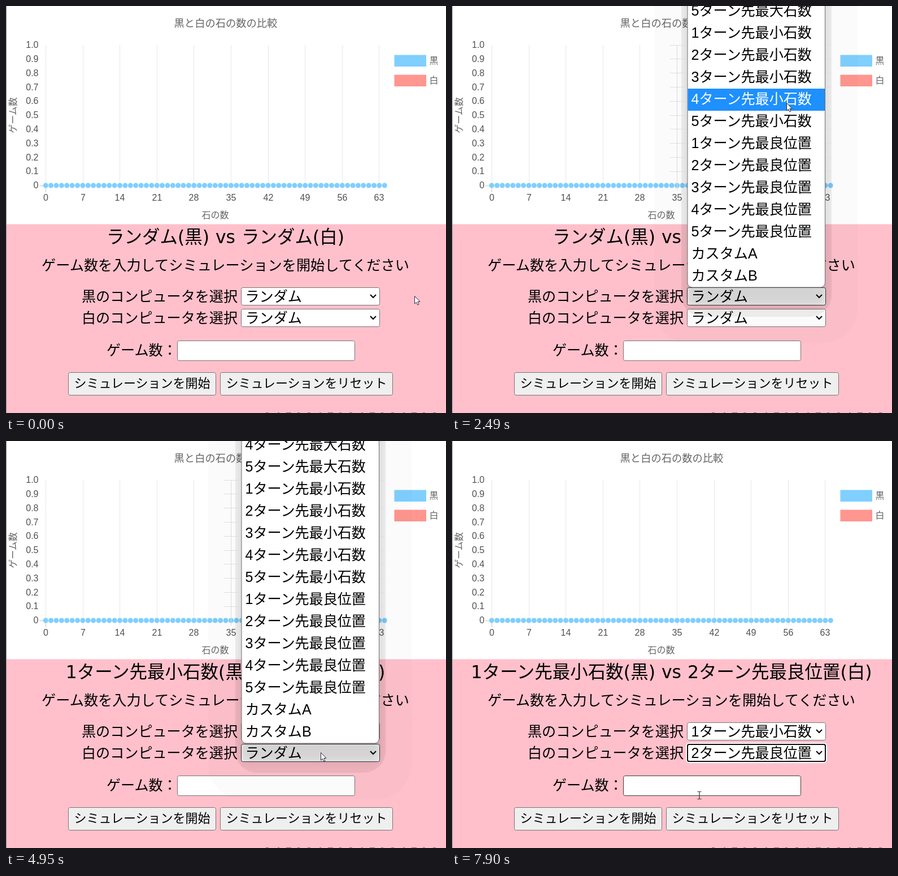
An HTML page for the animation above (8000 ms loop, 779 by 719 pixels).

```html
<!DOCTYPE html>
<html lang="ja">
<head>
<meta charset="utf-8">
<title>シミュレーション</title>
<style>
  html, body { margin: 0; width: 100%; height: 100%; overflow: hidden; background: #fff; }
  svg { display: block; width: 779px; height: 719px; }
  text { font-family: "Noto Sans CJK JP", "Noto Sans CJK", sans-serif; font-weight: 350; fill: #000; }
  .title {
    font-family: "DejaVu Sans", "Noto Sans CJK JP DemiLight", "Noto Sans CJK JP", sans-serif;
    font-weight: 400; word-spacing: 1px;
  }
  .arial { font-family: "Liberation Sans", "Noto Sans CJK JP", "Noto Sans CJK", sans-serif; }
  .chart text { fill: #666; }
  .chart .arial { fill: #505050; }
  .box { fill: #fff; stroke: #767676; }
  .button { fill: #efefef; stroke: #767676; }
  .hover { stroke: #3c3c3c; }
  .ring { fill: none; stroke: #fff; stroke-width: 2; }
  .focus { fill: none; stroke: #101010; stroke-width: 2; }
</style>
</head>
<body>
<svg id="stage" viewBox="0 0 779 719" xmlns="http://www.w3.org/2000/svg">
  <defs>
    <filter id="soft" x="-30%" y="-30%" width="160%" height="160%"><feGaussianBlur stdDeviation="8"/></filter>
  </defs>
</svg>
<script>
const LOOP = 8000;
const stage = document.getElementById('stage');

function el(parent, name, attrs = {}, content = '') {
  const node = document.createElementNS(stage.namespaceURI, name);
  for (const key in attrs) node.setAttribute(key, attrs[key]);
  node.textContent = content;
  parent.appendChild(node);
  return node;
}
const group = (parent, attrs) => el(parent, 'g', attrs);
const rect = (parent, x, y, width, height, attrs) => el(parent, 'rect', { x, y, width, height, ...attrs });
const path = (parent, d, attrs) => el(parent, 'path', { d, ...attrs });
// cy is the middle of the glyph body
const text = (parent, str, x, cy, size, attrs) =>
  el(parent, 'text', { x, y: cy + size * 0.36, 'font-size': size, ...attrs }, str);
const show = (node, on) => node.setAttribute('visibility', on ? 'visible' : 'hidden');

const middle = { 'text-anchor': 'middle' };
const tickX = k => 70.5 + k * 65.6;
const tickY = k => 317 - k * 24.8;

function drawChart() {
  const g = group(stage, { class: 'chart' });
  text(g, '黒と白の石の数の比較', 389, 30.5, 18.3, middle);
  for (let k = 0; k < 10; k++) {
    const x = Math.floor(tickX(k)) + 0.5;
    path(g, `M${x} 69V326`, { stroke: '#e8e8e8' });
    text(g, k * 7, x, 338.5, 16, { class: 'arial', ...middle });
  }
  path(g, 'M59 317.5H70M70.5 317V329', { stroke: '#c8c8c8' });
  for (let k = 0; k <= 10; k++) {
    const label = k ? (k / 10).toFixed(1) : '0';
    text(g, label, 57.5, tickY(k) - 0.5, 16, { class: 'arial', 'text-anchor': 'end' });
  }
  for (let n = 0; n <= 64; n++)
    el(g, 'circle', { cx: 70.3 + n * 9.375, cy: 317, r: 4.5, fill: '#7fcfff' });
  text(g, '石の数', 370.5, 369, 16, middle);
  text(g, 'ゲーム数', 0, 0, 16, { transform: 'translate(12.5 193) rotate(-90)', ...middle });
  [['黒', '#7fcfff'], ['白', '#ff968f']].forEach(([name, fill], i) => {
    rect(g, 687.5, 86.5 + i * 35, 56.5, 20.5, { fill });
    text(g, name, 749.5, 96 + i * 35, 16);
  });
}

function drawSelect(y) {
  const g = group(stage);
  const box = rect(g, 416.5, y + 0.5, 245, 31, { rx: 3 });
  const label = text(g, '', 423.5, y + 16, 25.1, { class: 'arial' });
  path(g, `M645 ${y + 13}l5 5 5-5`, { fill: 'none', stroke: '#000', 'stroke-width': 2 });
  const focus = group(g);
  rect(focus, 415, y - 1, 248, 34, { rx: 5, class: 'ring' });
  rect(focus, 417, y + 1, 244, 30, { rx: 3, class: 'focus' });
  return { y, box, label, focus };
}

function drawButton(str, x, width) {
  rect(stage, x + 0.5, 647.5, width - 1, 40, { rx: 3, class: 'button' });
  text(stage, str, x + width / 2, 666.5, 22, middle);
}

const options = [];
for (const kind of ['最大石数', '最小石数', '最良位置'])
  for (let n = 1; n <= 5; n++) options.push(n + 'ターン先' + kind);
options.push('カスタムA', 'カスタムB');
const ROW = 39;

// Option list that opens upwards and ends at the given bottom edge
function drawPopup(bottom) {
  const g = group(stage);
  rect(g, 358, -80, 360, bottom + 178, { rx: 60, fill: '#000', opacity: 0.014 });
  rect(g, 406, -80, 266, bottom + 132, { rx: 38, fill: '#000', opacity: 0.06 });
  rect(g, 416, -60, 246, bottom + 92, { rx: 12, fill: '#000', opacity: 0.1, filter: 'url(#soft)' });
  for (let k = 1; k <= 10; k++) {
    const y = Math.floor(tickY(k)) + 0.5;
    path(g, `M386 ${y}H417M661 ${y}H671`, { stroke: '#dedede' });
  }
  path(g, 'M398.5 69V326', { stroke: '#dcdcdc' });
  rect(g, 417, -60, 243.5, bottom + 60, { rx: 8, fill: '#fff', stroke: '#6e6e6e' });
  const mark = rect(g, 417.5, 0, 242.5, ROW, { fill: '#1e90ff' });
  const rows = [];
  options.forEach((name, i) => {
    const cy = bottom - 21.5 - (options.length - 1 - i) * ROW;
    if (cy > -25) rows.push({ cy, node: text(g, name, 423.5, cy, 25.1, { class: 'arial' }) });
  });
  return { g, mark, rows, bottom };
}

function updatePopup(popup, open, y) {
  show(popup.g, open);
  const hit = open && y < popup.bottom && popup.rows.find(r => Math.abs(y - r.cy) <= ROW / 2);
  popup.mark.setAttribute('visibility', hit ? 'inherit' : 'hidden');
  if (hit) popup.mark.setAttribute('y', Math.round(hit.cy - 17.5));
  for (const row of popup.rows) row.node.style.fill = row === hit ? '#fff' : '#000';
}

drawChart();
rect(stage, 0, 385.5, 779, 334, { fill: '#ffc0cb' });
path(stage, 'M0.5 0V719', { stroke: '#8a8a8a' });
path(stage, 'M460 718.5H764', { stroke: '#8a6a70', 'stroke-dasharray': '5 16 3 12 9 11 4 14' });
const title = text(stage, '', 388.5, 408, 31.5, { class: 'title', ...middle });
text(stage, 'ゲーム数を入力してシミュレーションを開始してください', 388.5, 458, 25.2, middle);
text(stage, '黒のコンピュータを選択', 134, 512.5, 25.1);
text(stage, '白のコンピュータを選択', 134, 551, 25.1);
text(stage, 'ゲーム数：', 178, 608, 25.1);
const black = drawSelect(497);
const white = drawSelect(535);
const input = rect(stage, 303.5, 591.5, 314, 35, { rx: 3 });
drawButton('シミュレーションを開始', 110, 262);
drawButton('シミュレーションをリセット', 379, 306);
const blackPopup = drawPopup(497);
const whitePopup = drawPopup(534);

const arrow = path(stage, 'M.5 .5V14L3.6 11.2 5.7 16 8 15 5.9 10.3H10Z',
  { fill: '#fff', stroke: '#2b2b3a', 'stroke-linejoin': 'round' });
const beam = path(stage, 'M-3.5-6.5H-1L0-6 1-6.5H3.5M0-6V6M-3.5 6.5H-1L0 6 1 6.5H3.5',
  { fill: 'none', stroke: '#333', 'stroke-width': 1.2 });

const linear = p => p;
const easeOut = p => 1 - (1 - p) ** 2;
const smooth = p => p * p * (3 - 2 * p);

// Pointer moves: first step, last step, number of steps, goal, easing
const moves = [
  [250, 800, 5, 602, 502, easeOut],
  [2050, 2479, 4, 592, 171, linear],
  [2621, 3050, 4, 598, 60, easeOut],
  [3600, 3600, 1, 599, 67, linear],
  [3760, 4560, 6, 557, 550, smooth],
  [5610, 6160, 5, 580, 328, easeOut],
  [7470, 7900, 4, 438, 626, easeOut],
];

function pointer(t) {
  let x = 723, y = 512;
  for (const [start, end, steps, toX, toY, ease] of moves) {
    if (t < start) break;
    const gap = (end - start) / Math.max(1, steps - 1);
    const done = gap ? Math.min(steps, 1 + Math.floor((t - start + 0.5) / gap)) : steps;
    const p = ease(done / steps);
    x += (toX - x) * p;
    y += (toY - y) * p;
  }
  return { x, y };
}

const inside = (p, x, y, w, h) => p.x >= x && p.x <= x + w && p.y >= y && p.y <= y + h;

function updateSelect(select, value, focused, hot) {
  select.label.textContent = value;
  select.box.setAttribute('class', hot ? 'box hover' : 'box');
  show(select.focus, focused);
}

function draw(t) {
  const p = pointer(t);
  const blackValue = t < 3600 ? 'ランダム' : '1ターン先最小石数';
  const whiteValue = t < 7200 ? 'ランダム' : '2ターン先最良位置';
  const blackOpen = t >= 1230 && t < 3600;
  const whiteOpen = t >= 4950 && t < 7200;
  const over = s => inside(p, 416, s.y, 246, 32);

  title.textContent = `${blackValue}(黒) vs ${whiteValue}(白)`;
  updateSelect(black, blackValue, t >= 3600 && t < 4950, blackOpen || over(black));
  updateSelect(white, whiteValue, t >= 7200, whiteOpen || over(white));
  updatePopup(blackPopup, blackOpen, p.y);
  updatePopup(whitePopup, whiteOpen, p.y);

  const typing = inside(p, 303, 591, 315, 36);
  input.setAttribute('class', typing ? 'box hover' : 'box');
  show(arrow, !typing);
  show(beam, typing);
  (typing ? beam : arrow).setAttribute('transform', `translate(${Math.round(p.x)} ${Math.round(p.y)})`);
}

function tick() {
  draw(performance.now() % LOOP);
  requestAnimationFrame(tick);
}
tick();
</script>
</body>
</html>
```
